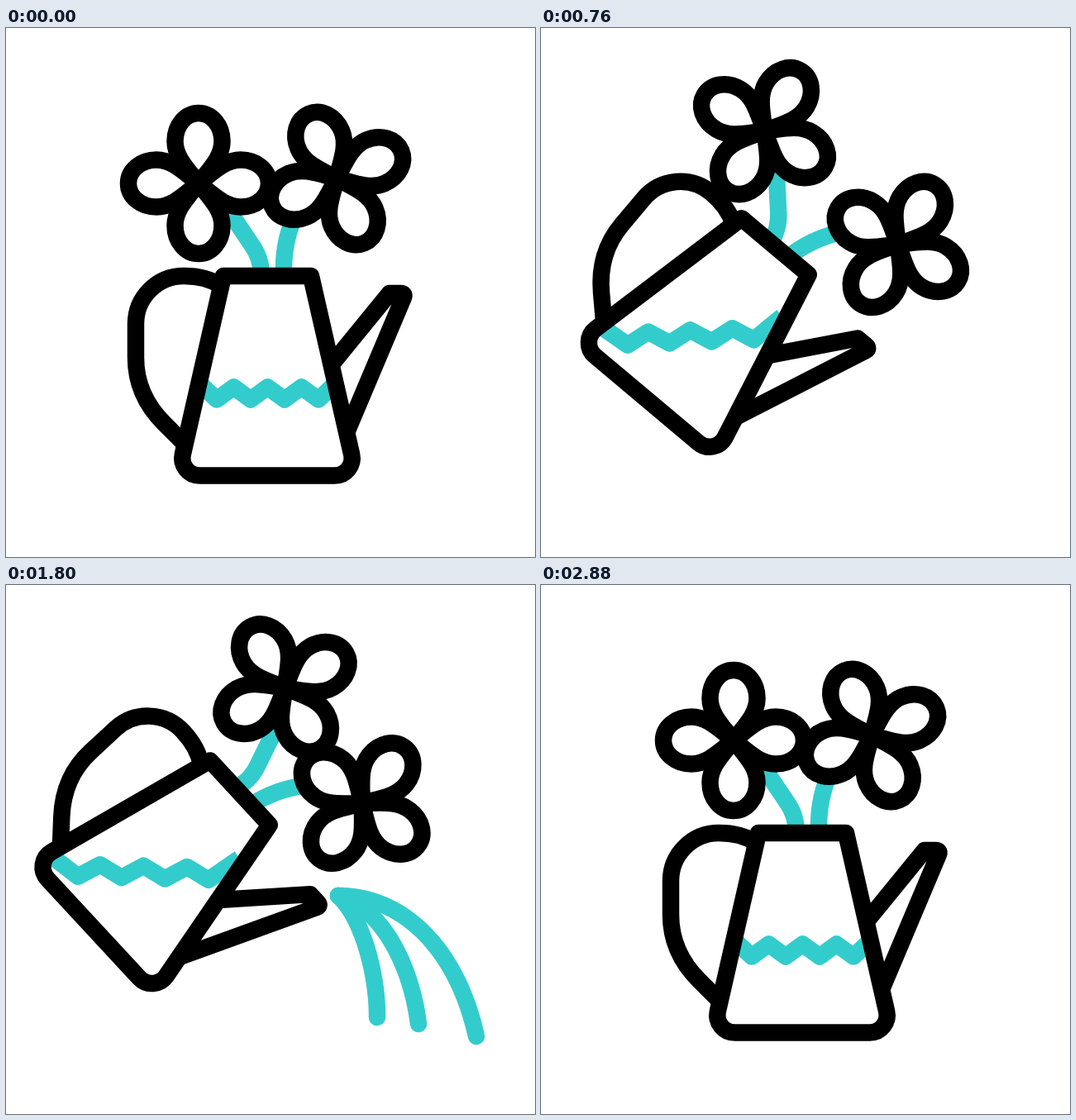
An HTML page with a canvas for the animation above (3 s loop, 640 by 640 pixels).

```html
<!DOCTYPE html>
<html lang="en">
<head>
<meta charset="utf-8">
<title>Watering can</title>
<style>
  html, body { margin: 0; width: 100%; height: 100%; overflow: hidden; background: #fff; }
  canvas { display: block; }
</style>
</head>
<body>
<canvas id="stage" width="640" height="640"></canvas>
<script>
const ctx = document.getElementById('stage').getContext('2d');
const LOOP = 3000, STEP = 40, LINE = 20.5;
const BLACK = '#000', TEAL = '#33cccc', WHITE = '#fff';
const PIVOT = 320, TILT = 47.2;
const rad = deg => deg * Math.PI / 180;

const handle = new Path2D('M260 312C247 303 232 300 215 300A58 58 0 0 0 157 358V399C157 430 170 457 191 478L214 501');
const spout = new Path2D('M384 419L464 321H477Q483 321 481 326L408 499');
const petal = new Path2D('M0 0C-14 -18 -28.5 -32 -28.5 -51C-28.5 -70 -16 -85 0 -85C16 -85 28.5 -70 28.5 -51C28.5 -32 14 -18 0 0Z');

const body = new Path2D();
body.moveTo(316, 300);
body.lineTo(369, 300);
body.arcTo(424, 541.5, 316, 541.5, 21);
body.arcTo(208, 541.5, 263, 300, 21);
body.lineTo(263, 300);
body.closePath();

const leftFlower = {
  base: [309, 300], center: [233, 188], turn: 0,
  stem: new Path2D('M309 304V300C309 284 305 273 297 262L266 216')
};
const rightFlower = {
  base: [336, 300], center: [400, 182], turn: -23.3,
  stem: new Path2D('M336 304V292C336 268 341 245 351 224')
};

function stroke(path, color = BLACK, width = LINE) {
  ctx.strokeStyle = color;
  ctx.lineWidth = width;
  ctx.stroke(path);
}

function fill(path) {
  ctx.fillStyle = WHITE;
  ctx.fill(path);
}

function saved(draw) {
  ctx.save();
  draw();
  ctx.restore();
}

function rotateAt(x, y, deg) {
  ctx.translate(x, y);
  ctx.rotate(rad(deg));
  ctx.translate(-x, -y);
}

function drawFlower({ base, center, turn, stem }, sway) {
  rotateAt(...base, sway);
  stroke(stem, TEAL);
  ctx.translate(...center);
  ctx.rotate(rad(turn));
  for (const paint of [fill, stroke]) {
    for (let i = 0; i < 4; i++) {
      paint(petal);
      ctx.rotate(Math.PI / 2);
    }
  }
}

function drawSpout(squeeze) {
  const scale = 1 - 0.06 * squeeze;
  ctx.translate(412, 440);
  ctx.scale(scale, scale);
  ctx.translate(-412, -440);
  stroke(spout, BLACK, LINE / scale);
}

// The water line stays nearly level while the can tips
function drawWave(x, y, tip, slosh) {
  const half = (123 + 35 * tip) / 6;
  const wave = new Path2D();
  wave.moveTo(-4.4 * half, -27);
  for (let i = -3; i <= 3; i++) wave.lineTo(i * half, i % 2 ? 0 : -15);
  wave.lineTo(4.4 * half, -27);
  ctx.translate(x, y);
  ctx.rotate(rad(slosh));
  stroke(wave, TEAL);
}

function bezier(a, b, c, d, s) {
  const r = 1 - s;
  return a * r * r * r + 3 * b * r * r * s + 3 * c * r * s * s + d * s * s * s;
}

// Higher reach: the stream lands farther out and starts flatter
function drawStream(reach, from, to) {
  const width = 47 + 40 * reach + 10 * reach * reach;
  const drop = 147 + 4.5 * reach + 3.5 * reach * reach;
  const path = new Path2D();
  for (let i = 0; i <= 40; i++) {
    const s = from + (to - from) * i / 40;
    path.lineTo(
      402 + bezier(0, 8 + 0.42 * width, 10 + 0.8 * width, width, s),
      376 + bezier(0, 24 - 12 * reach, 94 - 15 * reach, drop, s)
    );
  }
  stroke(path, TEAL);
}

function draw(t) {
  const ease = (from, to) => {
    const s = Math.min(1, Math.max(0, (t - from) / (to - from)));
    return s * s * (3 - 2 * s);
  };

  const tip = ease(433, 867) - ease(2222, 2657);
  const dip = 13.4 * (ease(200, 433) - ease(2657, 2870));
  const squeeze = ease(1000, 1160) - ease(1160, 1320);
  const slosh = -4 * ease(240, 680) + 5.5 * ease(680, 900)
    + 2.5 * ease(2220, 2440) - 4 * ease(2440, 2860);
  const leftSway = -12 * ease(433, 920) + 25 * ease(960, 1448) - 13 * ease(2220, 2660);
  const rightSway = 15 * ease(433, 760) + 8 * ease(900, 1160) - 9.5 * ease(1160, 1460)
    + 6.5 * ease(2240, 2440) - 20 * ease(2440, 2840);
  const pour = ease(1220, 1640), drain = ease(1840, 2240);

  // The can rises and returns along curves with different bends
  const [bendX, bendY] = t < LOOP / 2 ? [-43.8, -15.8] : [-68, -5];
  const along = (bend, end) => 2 * bend * tip * (1 - tip) + end * tip * tip;
  const shiftX = along(bendX, -49.1);
  const shiftY = dip + along(bendY, -65.6);
  const angle = TILT * tip;
  const place = () => {
    ctx.translate(shiftX, shiftY);
    rotateAt(PIVOT, PIVOT, angle);
  };

  ctx.fillStyle = WHITE;
  ctx.fillRect(0, 0, 640, 640);
  ctx.lineJoin = 'round';

  saved(() => {
    place();
    saved(() => drawFlower(leftFlower, leftSway));
    saved(() => drawFlower(rightFlower, rightSway));
    stroke(handle);
    saved(() => drawSpout(squeeze));
    fill(body);
  });

  const c = Math.cos(rad(angle)), s = Math.sin(rad(angle));
  const waveX = PIVOT + shiftX - 3.5 * c - 129.5 * s - 7.5 * tip;
  const waveY = PIVOT + shiftY - 3.5 * s + 129.5 * c + 1.5 * tip + 5 * squeeze;
  saved(() => {
    place();
    ctx.clip(body);
    ctx.resetTransform();
    drawWave(waveX, waveY, tip, slosh);
  });

  saved(() => {
    place();
    stroke(body);
  });

  if (pour > 0 && drain < 1) {
    saved(() => {
      ctx.lineCap = 'round';
      for (let reach = 0; reach < 3; reach++) drawStream(reach, drain, pour);
    });
  }
}

const start = performance.now();
function tick() {
  const t = (performance.now() - start) % LOOP;
  draw(Math.floor(t / STEP) * STEP);
  requestAnimationFrame(tick);
}
tick();
</script>
</body>
</html>
```
